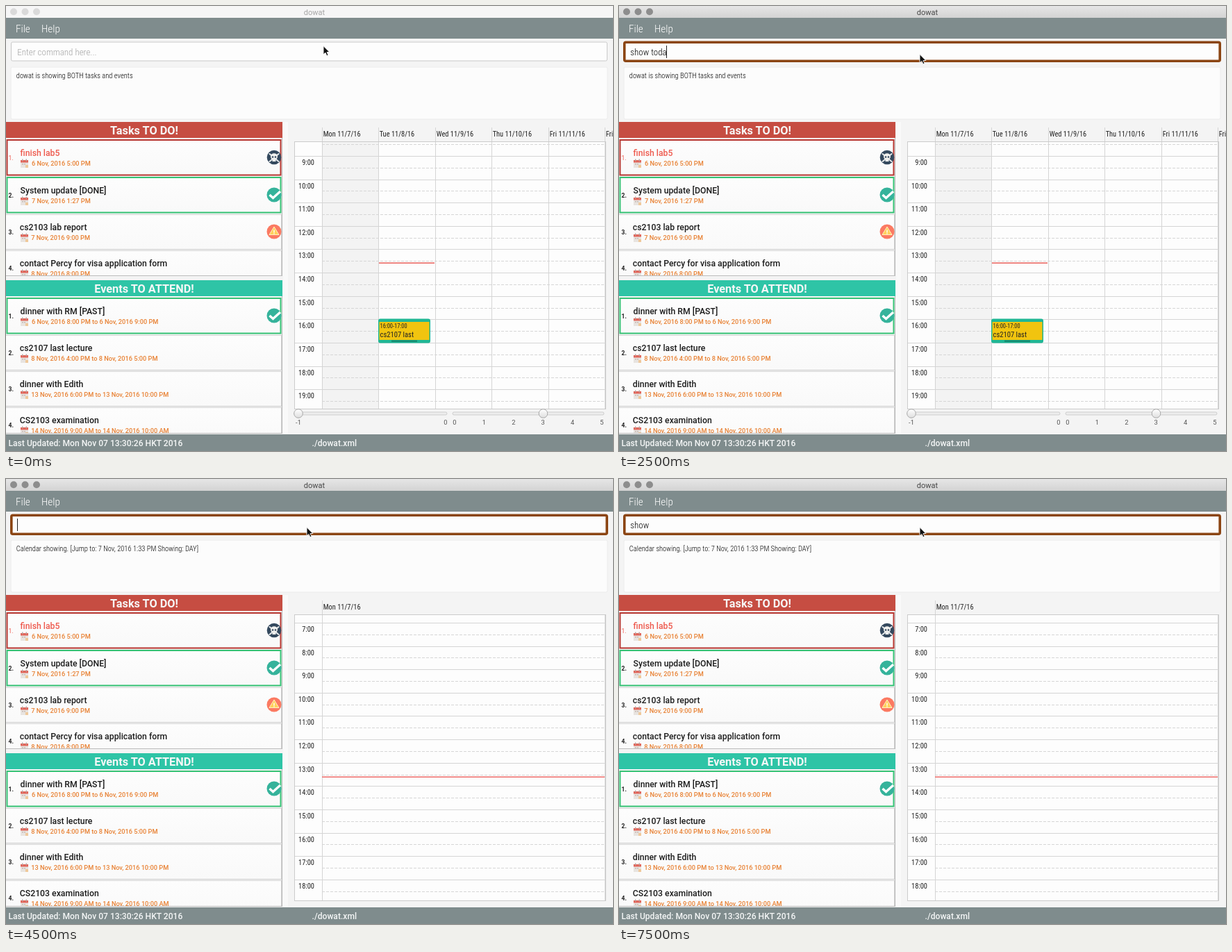
Recreate the animation shown at these times as an HTML page. Size 874 px wide and 641 px high, loop 8 s.

```html
<!DOCTYPE html>
<html lang="en">
<head>
<meta charset="utf-8">
<title>dowat</title>
<style>
  html, body { margin: 0; width: 100%; height: 100%; overflow: hidden; background: #f4f4f4; }
  svg { display: block; width: 874px; height: 641px; }
  text { font-family: Roboto, sans-serif; white-space: pre; }
  .narrow { font-family: "Roboto Condensed", Roboto, sans-serif; font-stretch: 75%; }
</style>
</head>
<body>
<svg id="stage" viewBox="0 0 874 641"></svg>
<script>
const stage = document.getElementById('stage');
const LOOP = 8000;

const rect = (x, y, w, h, fill, more = '') =>
  `<rect x="${x}" y="${y}" width="${w}" height="${h}" fill="${fill}" ${more}/>`;
const frame = (x, y, w, h, color, width, fill = 'none', radius = 0) =>
  rect(x + width / 2, y + width / 2, w - width, h - width, fill,
    `stroke="${color}" stroke-width="${width}" rx="${radius}"`);
const circle = (x, y, r, fill, more = '') => `<circle cx="${x}" cy="${y}" r="${r}" fill="${fill}" ${more}/>`;
const path = (d, more) => `<path d="${d}" ${more}/>`;
const hLine = (x, y, w, color) => rect(x, y, w, 1, color);
const vLine = (x, y, h, color) => rect(x, y, 1, h, color);

// y is the middle of the capital letters
const text = (x, y, size, fill, str, { weight = 400, anchor = 'start', cls = '', id = '' } = {}) =>
  `<text ${id && `id="${id}"`} class="${cls}" x="${x}" y="${(y + size * 0.355).toFixed(2)}" font-size="${size}"
    font-weight="${weight}" fill="${fill}" text-anchor="${anchor}">${str}</text>`;
const narrow = (x, y, size, fill, str, opts = {}) => text(x, y, size, fill, str, { ...opts, cls: 'narrow' });

const icons = {
  skull: y => circle(386, y, 10.3, '#34495e') +
    path(`M379.5 ${y - 5}l13 11m0-11l-13 11`, 'stroke="#e6e9ea" stroke-width="2" stroke-linecap="round"') +
    `<ellipse cx="386" cy="${y - 1}" rx="5" ry="4.8" fill="#f0f0ee"/>` + rect(383.5, y + 2, 5, 4, '#f0f0ee') +
    circle(384, y - .5, 1.3, '#34495e') + circle(388, y - .5, 1.3, '#34495e'),
  check: y => circle(386, y, 10.5, '#35b39b') +
    path(`M379.5 ${y}l5 4.5L395 ${y - 5}`, 'fill="none" stroke="#fff" stroke-width="3.4"'),
  warn: y => circle(386, y, 10.5, '#fb7a62') +
    path(`M386 ${y - 7}l7 11.5h-14z`, 'fill="#ffd05b" stroke="#fff0c4" stroke-width="1" stroke-linejoin="round"') +
    rect(385.3, y - 2.5, 1.4, 4, '#fff') + rect(385.3, y + 2.2, 1.4, 1.3, '#fff')
};

const calendarIcon = y => rect(21, y - 5, 11, 11, '#e8e4e0') + rect(21, y - 5, 11, 3.5, '#e2665b') +
  rect(23, y - 6.5, 1.5, 3, '#b9a49f') + rect(28.5, y - 6.5, 1.5, 3, '#b9a49f') +
  rect(23, y, 2, 1.5, '#c8b9b2') + rect(26, y, 2, 1.5, '#c8b9b2') + rect(28, y + 2, 4, 4, '#efc99b');

function row([y, title, date, icon, border], i) {
  const red = icon === 'skull';
  const x = border ? 20.6 : 19.8;
  return rect(0, y - 19, 397, 51, 'url(#rowFill)') +
    (border ? frame(.5, y - 20, 396, 52.5, border, 2)
            : hLine(0, y - 19, 397, '#d6d6d6') + hLine(0, y + 31, 397, '#cecece') + vLine(396, y - 19, 51, '#cfcfcf')) +
    text(3.5, y + 6.5, 8.6, red ? '#ee5a4e' : '#222', `${i + 1}.`, { weight: red ? 400 : 700 }) +
    text(x, y, 12.25, red ? '#ee5a4e' : '#1c1c1c', title, { weight: 500 }) +
    calendarIcon(y + 15) +
    text(x + 16.4, y + 15, 9.2, '#e88032', date, { weight: 500 }) +
    (icon ? icons[icon](y + 6) : '');
}

function list(top, bottom, color, heading, rows, clip) {
  return rect(0, top, 398, 23, color) +
    text(199, top + 12, 16.3, '#f7f7f7', heading, { weight: 700, anchor: 'middle' }) +
    `<clipPath id="${clip}">${rect(0, top + 23, 399, bottom - top - 23, '#000')}</clipPath>
     <g clip-path="url(#${clip})">${rows.map(row).join('')}</g>` +
    vLine(397, top + 23, bottom - top - 23, '#bcbcbc') + hLine(0, bottom - 1, 398, '#bcbcbc');
}

const GREEN = '#35c274';
const tasks = [
  [212, 'finish lab5', '6 Nov, 2016 5:00 PM', 'skull', '#b6352f'],
  [266, 'System update [DONE]', '7 Nov, 2016 1:27 PM', 'check', GREEN],
  [319, 'cs2103 lab report', '7 Nov, 2016 9:00 PM', 'warn'],
  [371, 'contact Percy for visa application form', '8 Nov, 2016 8:00 PM']
];
const events = [
  [440, 'dinner with RM [PAST]', '6 Nov, 2016 8:00 PM to 6 Nov, 2016 9:00 PM', 'check', GREEN],
  [493, 'cs2107 last lecture', '8 Nov, 2016 4:00 PM to 8 Nov, 2016 5:00 PM'],
  [545, 'dinner with Edith', '13 Nov, 2016 6:00 PM to 13 Nov, 2016 10:00 PM'],
  [597, 'CS2103 examination', '14 Nov, 2016 9:00 AM to 14 Nov, 2016 10:00 AM']
];

const HOUR = 33.62;
function agenda(firstHour, firstY, bottom, days, dayWidth) {
  let out = rect(415, 195, 449, bottom - 195, '#fdfdfd');
  if (days.length > 1) out += rect(455, 195, 81, bottom - 195, '#f3f3f3');
  for (let y = firstY - HOUR / 2, half = 1; y < bottom - 1; y += HOUR / 2, half++) {
    const at = Math.round(y);
    if (at < 197) continue;
    out += half % 2
      ? path(`M455 ${at + .5}H862`, 'stroke="#d6d6d6" stroke-dasharray="4 2"')
      : hLine(415, at, 447, '#d5d5d5');
  }
  for (let h = 0; h < (days.length > 1 ? 11 : 12); h++)
    out += narrow(444, firstY + 9.3 + h * HOUR, 10.4, '#222', `${firstHour + h}:00`, { anchor: 'end' });
  days.forEach((day, i) => {
    const x = Math.round(455 + i * dayWidth - .4);
    out += vLine(x, 175, bottom - 175, '#d5d5d5') + narrow(x + 1.7, 184.3, 10.4, '#222', day);
  });
  return out + vLine(862, 195, bottom - 195, '#d5d5d5') + frame(415, 195, 449, bottom - 194, '#cbcbcb', 1);
}

const slider = (x, w, knob, labels) =>
  rect(x, 585, w, 4, '#ededed', 'rx="2" stroke="#c6c6c6" stroke-width=".8"') +
  circle(knob, 587, 6.3, 'url(#knob)', 'stroke="#a9a9a9"') +
  labels.map(([lx, s]) => text(lx, 599.5, 9.4, '#555', s, { anchor: 'middle' })).join('');

const week = agenda(9, 216, 580, ['Mon 11/7/16', 'Tue 11/8/16', 'Wed 11/9/16', 'Thu 11/10/16', 'Fri 11/11/16', 'Fri 11/12/16'], 81.5) +
  rect(537, 369.5, 80, 1.4, '#e8554f') +
  rect(536, 450.5, 75, 35, '#1fb795', 'rx="3"') + rect(537.5, 455, 72, 26, '#f1c40f') +
  rect(555, 481.5, 37, 2.4, '#148a6f') +
  narrow(538.5, 460.8, 8.4, '#222', '16:00-17:00') + narrow(538.5, 473.2, 10.6, '#222', 'cs2107 last') +
  slider(415, 220, 421, [[421, '-1'], [633, '0']]) +
  slider(643, 218, 773.5, [0, 1, 2, 3, 4, 5].map(n => [646 + n * 42.4, n]));
const day = agenda(7, 207, 607, ['Mon 11/7/16'], 407) + rect(455, 428.5, 407, 1.5, '#ee6b68');

const dots = color => [11, 27.5, 44].map(x => circle(x, 8.3, 5, color)).join('');
const titleBar = (fill, dot, ink) => rect(0, 0, 874, 17, fill) + dots(dot) +
  text(444, 8.8, 11, ink, 'dowat', { anchor: 'middle' });

stage.innerHTML = `
<defs>
  <linearGradient id="bar" x2="0" y2="1"><stop stop-color="#e6e6e6"/><stop offset="1" stop-color="#d3d3d3"/></linearGradient>
  <linearGradient id="knob" x2="0" y2="1"><stop stop-color="#fff"/><stop offset="1" stop-color="#dedede"/></linearGradient>
  <linearGradient id="rowFill" x2="0" y2="1"><stop stop-color="#fdfdfd"/><stop offset="1" stop-color="#f9f9f9"/></linearGradient>
</defs>` +
  rect(0, 0, 874, 641, '#f4f4f4') +
  `<g id="idle">${titleBar('#f6f6f6', '#dadada', '#a5a5a5') +
    frame(7, 51.5, 859, 28, '#c9c9c9', 1, '#fdfdfd', 2) +
    narrow(16.3, 66, 13, '#a4a4a4', 'Enter command here...', { weight: 300 })}</g>` +
  `<g id="active">${titleBar('url(#bar)', '#8d8d8d', '#474747') +
    frame(6, 50.5, 861, 30.5, '#8b4513', 3.6, '#fdfdfd', 2)}</g>` +
  rect(0, 17, 874, 30, '#7f8c8d') +
  narrow(14, 33, 15.2, '#fff', 'File', { weight: 300 }) +
  narrow(51, 33, 15.2, '#fff', 'Help', { weight: 300 }) +
  narrow(16.3, 66, 13, '#000', '', { weight: 300, id: 'command' }) +
  rect(16, 57, 1, 18, '#222', 'id="caret"') +
  rect(7, 88, 859, 75, '#fcfcfc', 'rx="2" stroke="#ececec"') +
  narrow(14.8, 100, 10.5, '#000', '', { weight: 300, id: 'message' }) +
  list(167, 389, '#c64d42', 'Tasks TO DO!', tasks, 'taskClip') +
  list(395, 616, '#2ec4a6', 'Events TO ATTEND!', events, 'eventClip') +
  rect(399, 167, 7, 449, '#f9f9f9') +
  `<g id="week">${week}</g><g id="day">${day}</g>` +
  rect(0, 617, 874, 24, '#7f8c8d') +
  text(3.5, 630, 12.1, '#f4f6f6', 'Last Updated: Mon Nov 07 13:30:26 HKT 2016', { weight: 500 }) +
  text(440.5, 630, 12.1, '#f4f6f6', './dowat.xml', { weight: 500 }) +
  path('M0 0V12.4L2.9 9.8L4.9 14.2L7 13.3L5.1 9H8.9Z', 'id="pointer" fill="#111" stroke="#fff" stroke-width=".9"');

const [idle, active, command, caret, message, weekView, dayView, pointer] =
  ['idle', 'active', 'command', 'caret', 'message', 'week', 'day', 'pointer'].map(id => document.getElementById(id));

// time, typed text, caret visible
const steps = [
  [0, '', 0], [750, '', 1], [1250, '', 0], [1500, 'sho', 1], [1750, 'show ', 1], [2000, 'show t', 1],
  [2250, 'show tod', 1], [2500, 'show toda', 1], [2750, 'show today', 1], [3000, 'show today ', 1],
  [3500, 'show today ', 0], [3750, 'show today /', 1], [4000, 'show today /da', 1], [4250, 'show today /day', 1],
  [4500, '', 1], [5000, '', 0], [5500, '', 1], [5750, 's', 1], [6000, 'sho', 1], [6250, 'show', 1],
  [6750, 'show', 0], [7000, 'show ', 1], [7500, 'show ', 0]
];
const show = (node, on) => { node.style.display = on ? '' : 'none'; };
const write = (node, str) => { if (node.textContent !== str) node.textContent = str; };

function draw() {
  const t = performance.now() % LOOP;
  const [, typed, caretOn] = steps.findLast(([at]) => at <= t);
  const focused = t >= 500, jumped = t >= 4500;
  show(idle, !focused);
  show(active, focused);
  show(weekView, !jumped);
  show(dayView, jumped);
  show(caret, caretOn);
  write(command, typed);
  caret.setAttribute('x', Math.round(16 + (typed ? command.getComputedTextLength() : 0)));
  write(message, jumped ? 'Calendar showing. [Jump to: 7 Nov, 2016 1:33 PM Showing: DAY]'
                        : 'dowat is showing BOTH tasks and events');
  pointer.setAttribute('transform', t < 250 ? 'translate(457 57.5)' : 'translate(433 69.5)');
  requestAnimationFrame(draw);
}
draw();
</script>
</body>
</html>
```
